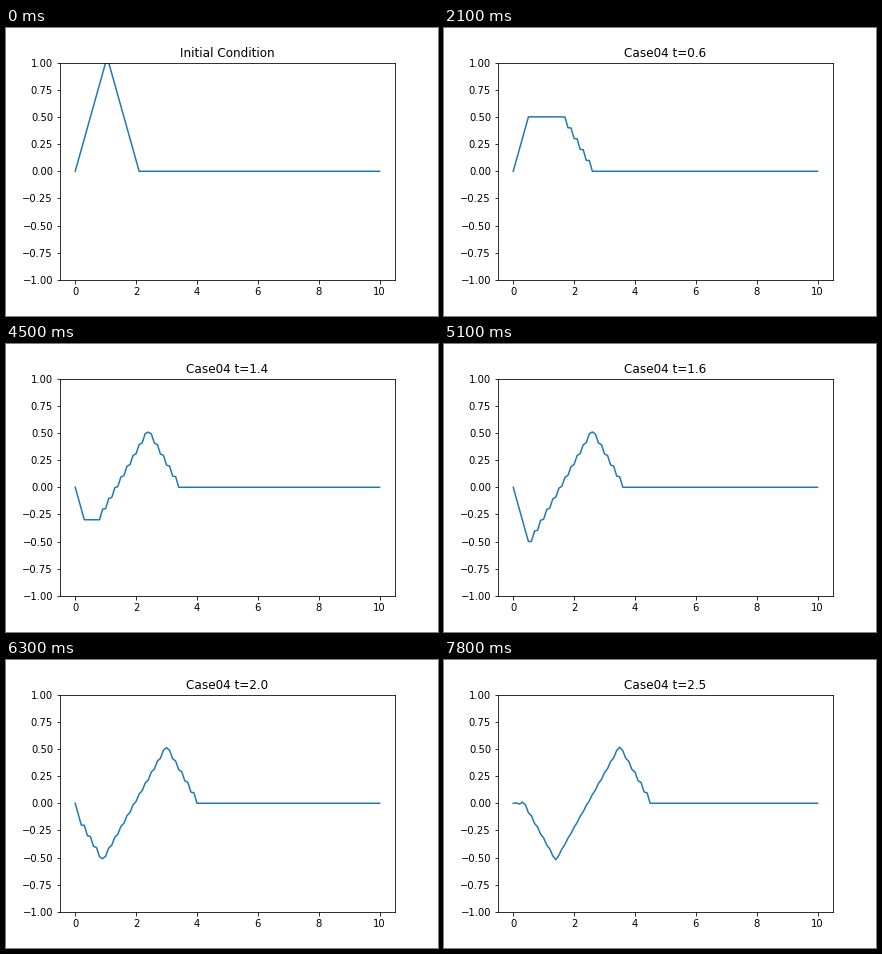
Recreate the animation shown at these times as a matplotlib script. Size 432x288 px, loop 8000 ms.

```python
import matplotlib.pyplot as plt
import numpy as np
from matplotlib.animation import FuncAnimation

DX = DT = 0.1
SPEED = 0.999
STEPS = 26
TICK_MS = 100
TICKS_PER_STEP = 3
LOOP_MS = 8000

plt.rcParams["font.family"] = "DejaVu Sans"


def solve_wave(start, steps):
    """Leapfrog solution on a string with fixed ends, released from rest."""
    courant2 = (SPEED * DT / DX) ** 2
    states = [start, start.copy()]
    while len(states) < steps:
        before, now = states[-2:]
        after = np.zeros_like(now)
        bend = now[2:] - 2 * now[1:-1] + now[:-2]
        after[1:-1] = 2 * now[1:-1] - before[1:-1] + courant2 * bend
        states.append(after)
    return states


x = np.arange(101) * DX
pluck = np.clip(np.minimum(x, 2.1 - x), 0, 1)
states = solve_wave(pluck, STEPS)

fig, ax = plt.subplots(figsize=(6, 4), dpi=72)
fig.subplots_adjust(left=0.125, right=0.9, bottom=0.125, top=0.88)
line, = ax.plot(x, pluck, color="#1f77b4", lw=1.5)
ax.set_xlim(-0.5, 10.5)
ax.set_ylim(-1, 1)
ax.set_xticks(np.arange(0, 11, 2))
ax.set_yticks(np.linspace(-1, 1, 9))
title = ax.set_title("Initial Condition", fontsize=12)


def update(tick):
    step = tick // TICKS_PER_STEP - 1
    line.set_ydata(states[max(step, 0)])
    title.set_text("Initial Condition" if step < 0 else f"Case04 t={step * DT:.1f}")
    return line, title


anim = FuncAnimation(fig, update, frames=LOOP_MS // TICK_MS, interval=TICK_MS,
                     repeat=True, repeat_delay=0)
plt.show()
```
